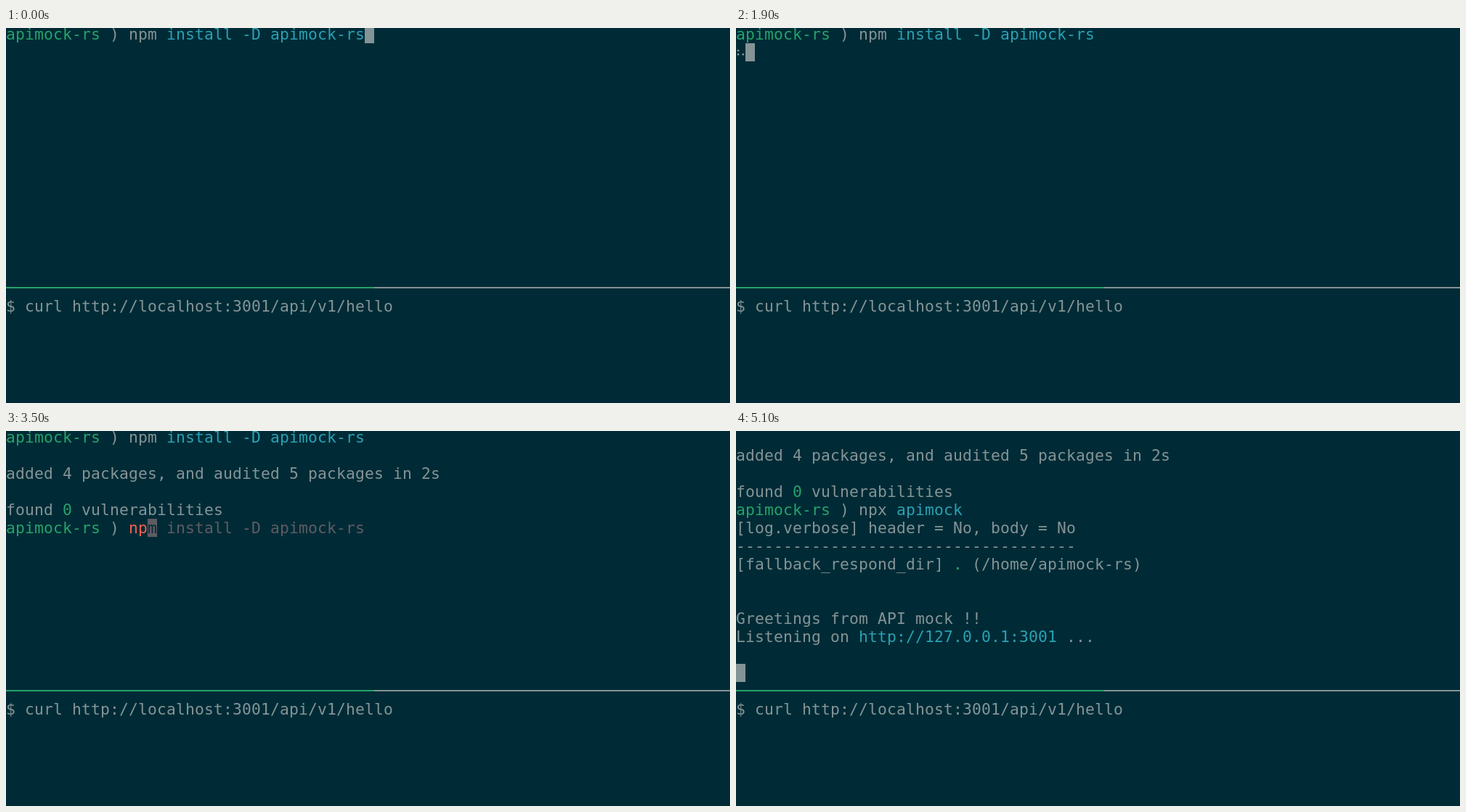
Write an HTML page that moves like this. It is 997 by 517 pixels and loops after 8 s.

```html
<!DOCTYPE html>
<html lang="en">
<head>
<meta charset="utf-8">
<title>Terminal session</title>
<style>
  html, body { margin: 0; width: 100%; height: 100%; overflow: hidden; background: #002b36; }
  svg { display: block; }
  text { font: 21.333px "DejaVu Sans Mono", monospace; white-space: pre; }
</style>
</head>
<body>
<svg id="stage" width="997" height="517" viewBox="0 0 997 517" xmlns="http://www.w3.org/2000/svg">
  <rect width="997" height="517" fill="#002b36"/>
  <g id="screen"></g>
  <rect y="357" width="507" height="2" fill="#26a269"/>
  <rect x="507" y="357" width="490" height="2" fill="#839496"/>
</svg>
<script>
const LOOP = 8000, TICK = 100;
const CELL_W = 13, ROW_H = 25, TOP = -4, ASCENT = 20;
const BG = '#002b36', FG = '#839496', GREEN = '#26a269', CYAN = '#2aa1b3',
      RED = '#f66151', DIM = '#5e5c64';

const screen = document.getElementById('screen');

function add(tag, attrs, content = '') {
  const el = document.createElementNS('http://www.w3.org/2000/svg', tag);
  for (const key in attrs) el.setAttribute(key, attrs[key]);
  el.textContent = content;
  screen.appendChild(el);
}

const rowTop = row => TOP + row * ROW_H;

// Every character sits on the terminal grid.
function write(row, col, str, fill = FG, weight = 400) {
  const x = [...str].map((_, i) => (col + i) * CELL_W).join(' ');
  add('text', { x, y: rowTop(row) + ASCENT, fill, 'font-weight': weight }, str);
}

// Each segment is [text, colour, weight].
function line(row, ...segments) {
  let col = 0;
  for (const [str, fill, weight] of segments) {
    write(row, col, str, fill, weight);
    col += str.length;
  }
}

function cursor(row, col, fill = FG) {
  add('rect', { x: col * CELL_W, y: rowTop(row), width: CELL_W, height: ROW_H, fill });
}

const prompt = (row, ...command) => line(row, ['apimock-rs', GREEN], [' ) '], ...command);

// Braille dots lit in each spinner phase (1-3 left column, 4-6 right column).
const PHASES = ['124', '145', '1456', '456', '3456', '356', '236', '1236', '123', '1234'];

function spinner(t) {
  const phase = PHASES[Math.floor((t - 600) / 80) % PHASES.length];
  for (const dot of phase) {
    const i = dot - 1;
    add('circle', { cx: i < 3 ? 3 : 9.8, cy: 25.8 + (i % 3) * 5.3, r: 1.4, fill: FG });
  }
}

function installing(t) {
  if (t < 500) return cursor(0, 38);
  if (t < 700) return cursor(1, 0);
  spinner(t);
  cursor(1, 1);
}

function report(row) {
  line(row, ['added 4 packages, and audited 5 packages in 2s']);
  line(row + 2, ['found '], ['0', GREEN, 700], [' vulnerabilities']);
}

function typing(t) {
  if (t < 3500) {
    prompt(5);
    cursor(5, 13);
  } else if (t < 3600) {
    prompt(5, ['np', RED], ['m install -D apimock-rs', DIM]);
    cursor(5, 15, DIM);
    write(5, 15, 'm', BG);
  } else {
    const name = t < 3900 ? '' : t < 4000 ? 'apimo' : 'apimock';
    prompt(5, ['npx '], [name, CYAN]);
    if (t < 5000) cursor(5, name ? 17 + name.length : 16);
    else cursor(6, 0);
  }
}

function serving() {
  report(1);
  prompt(4, ['npx '], ['apimock', CYAN]);
  line(5, ['[log.verbose] header = No, body = No']);
  line(6, ['-'.repeat(36)]);
  line(7, ['[fallback_respond_dir] '], ['.', GREEN], [' (/home/apimock-rs)']);
  line(10, ['Greetings from API mock !!']);
  line(11, ['Listening on '], ['http://127.0.0.1:3001', CYAN], [' ...']);
  cursor(13, 0);
}

function draw(t) {
  screen.replaceChildren();
  if (t < 5100) {
    prompt(0, ['npm '], ['install -D apimock-rs', CYAN]);
    if (t < 2900) {
      installing(t);
    } else {
      report(2);
      typing(t);
    }
  } else {
    serving();
  }
  line(15, ['$ curl http://localhost:3001/api/v1/hello']);
}

let shown = -1;
const start = performance.now();

function frame() {
  const elapsed = (performance.now() - start) % LOOP;
  const t = Math.floor(elapsed / TICK) * TICK;
  if (t !== shown) draw(shown = t);
  requestAnimationFrame(frame);
}
frame();
</script>
</body>
</html>
```
